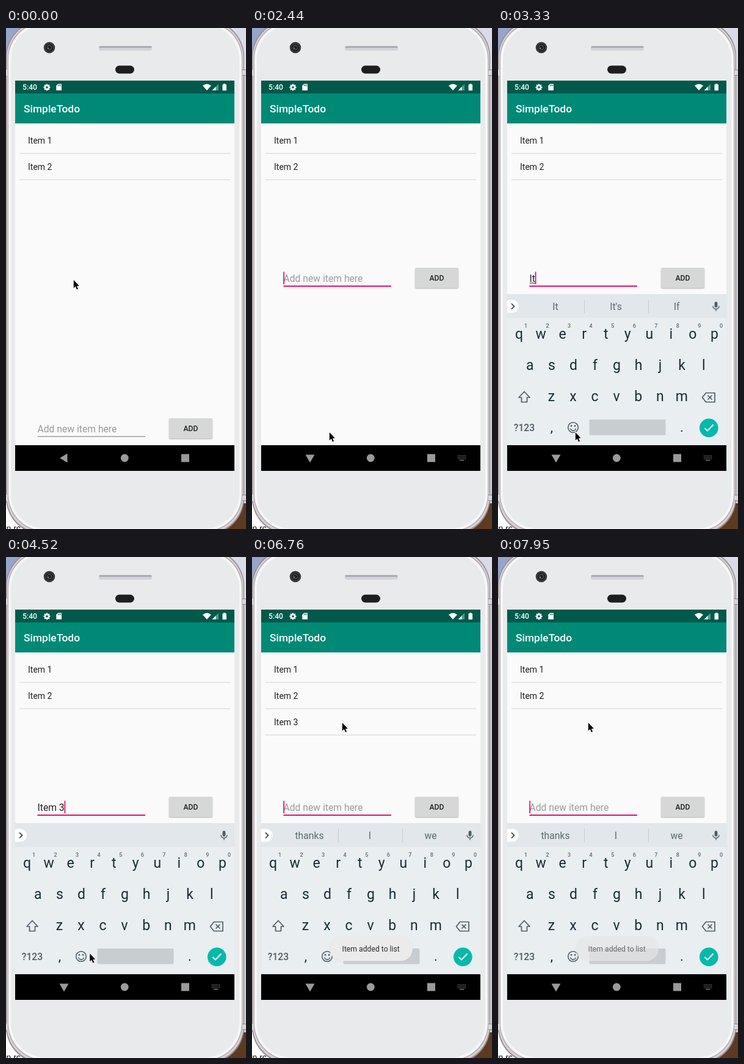
Write an HTML page with a canvas that moves like this. It is 393x819 px and loops after 8000 ms.

```html
<!DOCTYPE html>
<html lang="en">
<head>
<meta charset="utf-8">
<title>Todo app demo</title>
<style>
html, body { margin: 0; width: 100%; height: 100%; overflow: hidden; background: #e9ebec; }
canvas { display: block; width: 393px; height: 819px; }
</style>
</head>
<body>
<canvas id="stage"></canvas>
<script>
const W = 393, H = 819, LOOP = 8000;
const canvas = document.getElementById('stage');
const dpr = window.devicePixelRatio || 1;
canvas.width = W * dpr;
canvas.height = H * dpr;
const c = canvas.getContext('2d');
c.scale(dpr, dpr);

const PINK = '#e0146a', KEY = '#142d38', ICON = '#4d5d66', NAV = '#9a9a9a';

const ticks = [0];
for (const [a, b, n] of [[500, 1090, 5], [1990, 3030, 8], [3330, 3630, 3], [4070, 4220, 2],
  [4520, 5560, 8], [5710, 6610, 7], [6760, 6760, 1], [7200, 7950, 6]]) {
  for (let i = 0; i < n; i++) ticks.push(Math.ceil((a + (n > 1 ? (b - a) * i / (n - 1) : 0)) / 10) * 10);
}

const pointer = [[400, 110, 411], [650, 117, 480], [800, 116, 570], [950, 106, 633], [1090, 97, 650],
  [1950, 97, 650], [2440, 126, 660], [4450, 126, 660], [5000, 208, 560], [5410, 300, 422],
  [5560, 307, 410], [5800, 307, 410], [6200, 240, 330], [6610, 150, 273], [6760, 147, 270]];

const idle = ['thanks', 'I', 'we'];
const entries = [
  [0, '', idle], [3030, 'I', ['I', "I'm", "I'll"]], [3330, 'It', ['It', "It's", 'If']],
  [3480, 'Ite', ['Ite', 'Item', 'Items']], [3630, 'Item', ['Item', 'Items', 'Item\u2019s']],
  [4070, 'Item ', ['and', 'is', 'number']], [4520, 'Item 3', []], [5860, '', idle]];

const clamp = v => Math.max(0, Math.min(1, v));
const ramp = (t, a, b) => clamp((t - a) / (b - a));
const last = (list, t, at) => list.reduce((r, e) => at(e) <= t ? e : r);

function pointerAt(t) {
  const i = pointer.findIndex(p => p[0] > t);
  if (i === 0) return pointer[0].slice(1);
  if (i < 0) return pointer[pointer.length - 1].slice(1);
  const a = pointer[i - 1], b = pointer[i], k = ramp(t, a[0], b[0]);
  return [a[1] + (b[1] - a[1]) * k, a[2] + (b[2] - a[2]) * k];
}

function text(s, x, y, size, color, align = 'left', weight = 400) {
  c.font = `${weight} ${size}px Roboto, sans-serif`;
  c.textAlign = align;
  c.fillStyle = color;
  c.fillText(s, x, y);
}
function rect(x, y, w, h, color) {
  c.fillStyle = color;
  c.fillRect(x, y, w, h);
}
function round(x, y, w, h, r, color) {
  c.beginPath();
  c.roundRect(x, y, w, h, r);
  c.fillStyle = color;
  c.fill();
}
function disc(x, y, r, color) {
  c.beginPath();
  c.arc(x, y, r, 0, 7);
  c.fillStyle = color;
  c.fill();
}
function trace(pts, close) {
  c.beginPath();
  for (let i = 0; i < pts.length; i += 2) c.lineTo(pts[i], pts[i + 1]);
  if (close) c.closePath();
}
function poly(pts, color) {
  trace(pts, true);
  c.fillStyle = color;
  c.fill();
}
function line(pts, color, width, close) {
  trace(pts, close);
  c.strokeStyle = color;
  c.lineWidth = width;
  c.stroke();
}

function phone() {
  rect(0, 0, W, H, '#c9cad2');
  rect(0, 0, 60, 68, '#97a5cb');
  rect(340, 0, 53, 68, '#dadbe8');
  rect(0, 777, 80, 42, '#ffffff');
  rect(340, 777, 53, 42, '#5d3b22');
  c.font = '14px "Liberation Sans", Arial, sans-serif';
  c.textAlign = 'left';
  c.fillStyle = '#111';
  c.fillText('n rc', 0.5, 823);

  // Metal rim, thicker towards the bottom corners
  round(0, -13, 390, 841, 60, '#978d92');
  round(1.2, -11.8, 387.6, 838, 60, '#d8d0d4');
  round(2.8, -10, 384.4, 833, 60, '#b3abb0');
  round(4, -9, 382, 831, 60, '#f6f7f8');
  round(8, -5, 374, 823, 56, '#e8eaec');
  for (const y of [68, 763]) {
    rect(0, y, 3, 10, '#d9d5d8');
    rect(387, y, 6, 10, '#d9d5d8');
    rect(387, y, 6, 1, '#8f878c');
    rect(387, y + 9, 6, 1, '#8f878c');
  }

  disc(71, 32, 9.3, '#3d3c3f');
  disc(71, 32, 6.6, '#222124');
  disc(71, 32, 4.4, '#4b4b50');
  disc(71, 32, 2.8, '#17171a');
  disc(69.5, 33, 1, '#96969c');
  round(152, 29.5, 87, 7.5, 3, '#d3d2d9');
  round(152.5, 29.8, 86, 2.4, 1.2, '#a4a2ae');
  round(179, 61.5, 31, 13, 6.5, '#1e1e21');
}

function header() {
  rect(15, 86, 359, 638, '#fafafa');
  rect(15, 86, 359, 21, '#00594a');
  rect(15, 107, 359, 49, '#008a76');
  text('5:40', 27, 101.3, 12.2, '#fff', 'left', 500);
  text('SimpleTodo', 29, 138, 17.4, '#fff', 'left', 500);

  // Gear
  for (let i = 0; i < 4; i++) {
    const a = i * Math.PI / 4, x = Math.cos(a) * 5.5, y = Math.sin(a) * 5.5;
    line([67 - x, 97 - y, 67 + x, 97 + y], '#fff', 2.3);
  }
  disc(67, 97, 4.2, '#fff');
  disc(67, 97, 1.8, '#00594a');

  // Memory card
  poly([85, 91.5, 91, 91.5, 91, 102, 82.3, 102, 82.3, 94.3], '#fff');
  for (const x of [85, 87, 89]) rect(x, 92.8, 1, 2.3, '#00594a');

  // Wifi, signal, battery
  c.beginPath();
  c.moveTo(329, 102);
  c.lineTo(322, 94.2);
  c.quadraticCurveTo(329, 89, 336, 94.2);
  c.closePath();
  c.fillStyle = '#fff';
  c.fill();
  poly([348, 91.5, 348, 102, 337.5, 102], '#5c9489');
  poly([343.5, 96, 343.5, 102, 337.5, 102], '#fff');
  round(354.5, 92.3, 6.5, 10, 0.8, '#fff');
  rect(356.3, 91, 3, 2, '#fff');
}

function list(t) {
  const count = t >= 5860 && t < 7800 ? 3 : 2;
  if (t >= 7200 && t < 7800) rect(22, 249, 345, 42, t < 7350 ? '#f1f1f1' : '#e6e6e6');
  for (let i = 0; i < count; i++) {
    const y = 189 + i * 43;
    text('Item ' + (i + 1), 36, y, 14, '#212121');
    rect(22, y + 15, 345, 2, '#e6e6e6');
  }
}

function caretOn(t) {
  if (t < 1990) return false;
  const reset = [1990, 3030, 3330, 3480, 3630, 4070, 4220, 5760];
  return (t - last(reset, t, e => e)) % 1000 < 500;
}

function form(t, value) {
  const focus = t >= 1990, y = t >= 2290 ? 409 : 655;
  if (value) text(value, 51.5, y + 6, 15.7, '#212121');
  else text('Add new item here', 51.5, y + 6, 15.7, '#9b9b9b');
  const width = value ? c.measureText(value).width : 0;
  if (value && !value.includes(' ')) rect(52, y + 7.5, width - 0.5, 1, '#212121');
  rect(51.5, y + 12, 176.5, focus ? 2 : 1.5, focus ? PINK : '#a0a0a0');
  if (focus && caretOn(t)) rect(51.3 + width, y - 10.5, 1.8, 20.5, PINK);

  c.save();
  c.shadowColor = 'rgba(0,0,0,.3)';
  c.shadowBlur = 2 * dpr;
  c.shadowOffsetY = dpr;
  round(267, y - 17, 71, 33, 2, t >= 5710 && t < 6010 ? '#c3c4c4' : '#d6d7d7');
  c.restore();
  text('ADD', 302.5, y + 4, 12.2, '#212121', 'center', 500);
}

function keyboard(words) {
  rect(15, 435, 359, 247, '#e9eef1');
  rect(15, 435, 359, 39, '#e1e7ea');
  round(15, 444.5, 19, 21, [0, 10.5, 10.5, 0], '#fff');
  line([22, 450.5, 26.5, 455, 22, 459.5], '#26363e', 1.7);
  words.forEach((w, i) => text(w, [94, 193, 292.5][i], 461, 15.7, '#5a6a72', 'center'));
  if (words.length) for (const x of [141, 246]) rect(x, 444, 1, 22, '#c4ccd1');

  // Microphone
  round(354.6, 447.5, 4.8, 9.5, 2.4, ICON);
  c.strokeStyle = ICON;
  c.lineWidth = 1.4;
  c.beginPath();
  c.arc(357, 454.5, 5, 0, Math.PI);
  c.stroke();
  rect(356.3, 459.5, 1.4, 3.2, ICON);

  [['qwertyuiop', 34.5, 508], ['asdfghjkl', 52.3, 559], ['zxcvbnm', 87.5, 610]].forEach(([row, x, y], r) => {
    [...row].forEach((k, i) => {
      text(k, x + i * 35.55, y, 23, KEY, 'center');
      if (!r) text((i + 1) % 10, x + 11 + i * 35.55, 490, 9, '#5c6b73', 'center', 500);
    });
  });

  // Shift and backspace
  c.lineJoin = 'round';
  line([43, 594.5, 52, 604, 47.5, 604, 47.5, 611.5, 38.5, 611.5, 38.5, 604, 34, 604], ICON, 1.7, true);
  line([334.5, 604, 340.5, 596.5, 355, 596.5, 355, 611.5, 340.5, 611.5], ICON, 1.7, true);
  line([343.5, 600.5, 350.5, 607.5], ICON, 1.7);
  line([350.5, 600.5, 343.5, 607.5], ICON, 1.7);
  c.lineJoin = 'miter';

  text('?123', 43, 658.5, 15.7, ICON, 'center', 500);
  text(',', 88, 660, 22, KEY, 'center');
  text('.', 301, 660, 22, KEY, 'center');
  c.strokeStyle = ICON;
  c.lineWidth = 1.6;
  c.beginPath();
  c.arc(123, 653, 8.3, 0, 7);
  c.stroke();
  disc(120, 650.5, 1.4, ICON);
  disc(126, 650.5, 1.4, ICON);
  c.beginPath();
  c.arc(123, 653.5, 4.6, 0.25, Math.PI - 0.25);
  c.stroke();
  round(149.5, 640, 125, 25.5, 2, '#c8cdd1');
  disc(345.3, 653.7, 15.3, '#04b9ab');
  line([338.5, 654, 343, 658.5, 352.5, 648.5], '#fff', 1.9);
}

function navBar(open) {
  rect(15, 682, 359, 42, '#000');
  if (open) {
    poly([87.5, 697.5, 102.5, 697.5, 95, 710.5], NAV);
    for (let r = 0; r < 3; r++) for (let i = 0; i < 6; i++) rect(337 + i * 2.4, 698.5 + r * 2.5, 1.2, 1.2, '#858585');
    rect(340, 706, 7.5, 1.2, '#858585');
  } else {
    poly([88, 703, 100.5, 695.5, 100.5, 710.5], NAV);
  }
  disc(194.3, 703, 6.4, NAV);
  rect(287, 696.5, 13, 13, NAV);
}

function toast(alpha) {
  if (!alpha) return;
  c.save();
  c.globalAlpha = alpha;
  c.shadowColor = 'rgba(0,0,0,.06)';
  c.shadowBlur = 2 * dpr;
  round(127, 620, 136, 40.5, 20, '#ebebeb');
  c.shadowColor = 'transparent';
  text('Item added to list', 194.7, 644.5, 12.2, '#2b2b2b', 'center');
  c.restore();
}

function arrow(x, y) {
  c.save();
  c.translate(x + 0.8, y + 1);
  c.scale(0.88, 0.9);
  c.lineJoin = 'round';
  const shape = [0, 0, 0, 14.6, 3.4, 11.5, 5.9, 17.2, 8.2, 16.2, 5.8, 10.7, 10.4, 10.5];
  line(shape, '#fff', 2.2, true);
  poly(shape, '#000');
  c.restore();
}

function draw(t) {
  const [, value, words] = last(entries, t, e => e[0]);
  phone();
  header();
  list(t);
  form(t, value);
  const slide = 1 - (1 - ramp(t, 2440, 2800)) ** 2;
  if (slide) {
    c.save();
    c.beginPath();
    c.rect(15, 86, 359, 596);
    c.clip();
    c.globalAlpha = slide;
    c.translate(0, 247 * (1 - slide));
    keyboard(words);
    c.restore();
  }
  navBar(t >= 2290);
  toast(ramp(t, 5860, 6310) * (1 - ramp(t, 7820, 8190)));
  arrow(...pointerAt(t));
}

const start = performance.now();
function frame() {
  const t = (performance.now() - start) % LOOP;
  draw(last(ticks, t, e => e));
  requestAnimationFrame(frame);
}
frame();
</script>
</body>
</html>
```
